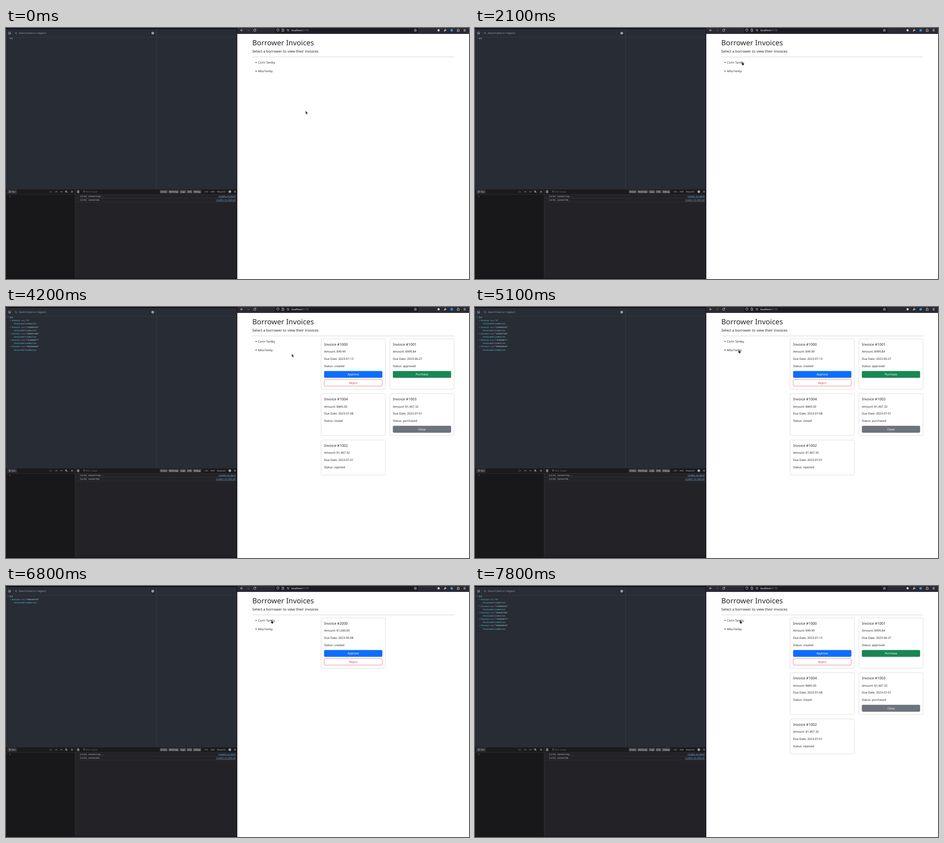
An HTML page with a canvas for the animation above (8000 ms loop, 1017 px wide and 551 px high).

```html
<!DOCTYPE html>
<html lang="en">
<head>
<meta charset="utf-8">
<title>Borrower Invoices</title>
<style>
html, body { margin: 0; width: 100%; height: 100%; overflow: hidden; background: #fff; }
canvas { display: block; }
</style>
</head>
<body>
<canvas id="stage" width="1017" height="551"></canvas>
<script>
const ctx = document.getElementById('stage').getContext('2d');
const LOOP = 8000;
const SANS = '"Noto Sans", sans-serif';
const MONO = '"Liberation Mono", monospace';
const CONSOLE = '"DejaVu Sans Mono", monospace';
const INK = '#212529', CYAN = '#61dafb', PALE = '#d7d7db';

function rect(x, y, w, h, color) {
  ctx.fillStyle = color;
  ctx.fillRect(x, y, w, h);
}

function round(x, y, w, h, r, fill, stroke, width = 0.6) {
  ctx.beginPath();
  ctx.roundRect(x, y, w, h, r);
  if (fill) { ctx.fillStyle = fill; ctx.fill(); }
  if (stroke) { ctx.strokeStyle = stroke; ctx.lineWidth = width; ctx.stroke(); }
}

function text(str, x, y, size, color, { family = SANS, weight = 400, align = 'left' } = {}) {
  ctx.font = `${weight} ${size}px ${family}`;
  ctx.textAlign = align;
  ctx.fillStyle = color;
  ctx.fillText(str, x, y);
}

function dot(x, y, r, color) {
  ctx.beginPath();
  ctx.arc(x, y, r, 0, 7);
  ctx.fillStyle = color;
  ctx.fill();
}

// Icon paths are centred on 0,0.
function icon(d, x, y, color = PALE, width = 0.8, fill) {
  ctx.save();
  ctx.translate(x, y);
  const path = new Path2D(d);
  if (fill) { ctx.fillStyle = fill; ctx.fill(path); }
  ctx.strokeStyle = color;
  ctx.lineWidth = width;
  ctx.stroke(path);
  ctx.restore();
}

const CROSS = 'M-2-2L2 2M2-2L-2 2';
const LENS = 'M.9-.5a1.5 1.5 0 1 1-3 0a1.5 1.5 0 1 1 3 0M.5.6L2.3 2.4';

function gear(x, y, color, hole) {
  for (let i = 0; i < 4; i++) {
    const a = i * Math.PI / 4, c = Math.cos(a) * 2.9, s = Math.sin(a) * 2.9;
    icon(`M${-c} ${-s}L${c} ${s}`, x, y, color, 1.1);
  }
  dot(x, y, 2.1, color);
  dot(x, y, 0.95, hole);
}

function drawInspector() {
  rect(0, 0, 508, 353, '#282c34');
  rect(0, 0, 508, 2, '#0d0c12');
  rect(0, 20, 508, 0.6, '#3d424a');
  rect(330, 2, 0.7, 351, '#3d424a');
  icon('M2.3-.2V-2.3H-2.3V2.3H-.4', 7.8, 11.4, '#b5b9c0', 0.7);
  icon('M0 0L3 1L1.6 1.6L1 3Z', 7.5, 11.2, '#b5b9c0', 0.5, '#b5b9c0');
  rect(15.3, 8, 0.6, 7, '#3d424a');
  icon(LENS, 22.2, 11.4, '#8f949d', 0.7);
  text('Search (text or /regex/)', 28.3, 13.2, 5.56, '#9b9ea5');
  gear(322.3, 11.3, '#cfd1d5', '#282c34');
}

function treeRow(row, depth, name, key, open) {
  const x = 7.5 + depth * 4.8, y = 24.1 + row * 7.15;
  if (open) icon('M-1.1-.6H1.1L0 .9Z', x - 2.9, y - 1.4, '#777d88', 0.1, '#777d88');
  const font = { family: MONO };
  text(name, x, y, 4.37, CYAN, font);
  if (!key) return;
  text('key', x + 21, y, 4.37, '#9d87d2', font);
  text('=', x + 28.9, y, 4.37, '#9aa0ab', font);
  text(`"${key}"`, x + 31.5, y, 4.37, '#cedae0', font);
}

function drawTree(keys) {
  treeRow(0, 0, 'app', '', keys.length > 0);
  keys.forEach((key, i) => {
    treeRow(1 + i * 2, 1, 'Invoice', key, true);
    treeRow(2 + i * 2, 2, 'InvoiceActionButton');
  });
}

function drawConsole() {
  rect(0, 353, 508, 198, '#232327');
  rect(0, 353, 152, 198, '#18181a');
  rect(0, 353, 508, 12.5, '#1b1b1e');
  rect(0, 353, 508, 0.7, '#38383d');
  rect(0, 365.2, 508, 0.6, '#38383d');
  rect(151.7, 353, 0.8, 198, '#38383d');

  round(2.8, 355, 21, 8.8, 1, '#343438');
  icon('M-1.7-2.2L1.9 0L-1.7 2.2Z', 9, 359.4, PALE, 0.6);
  text('Run', 12.9, 361, 4.37, PALE);
  text('{ }', 98, 361, 5, '#a5a5aa', { align: 'center' });
  icon('M-2.2 1.1L0-1.1L2.2 1.1', 110.4, 359.4);
  icon('M-2.2-1.1L0 1.1L2.2-1.1', 121.7, 359.4);
  icon(LENS, 132.6, 359.3, PALE, 0.9);
  icon(CROSS, 145, 359.4);
  icon('M-2.4-1.7H2.4M-.8-1.8V-2.6H.8V-1.8M-1.8-1.5V2.5H1.8V-1.5M-.6-.5V1.5M.6-.5V1.5', 158.5, 359.4, PALE, 0.7);
  icon('M-1.7-1.7H1.7L.4.1V1.9L-.4 1.4V.1Z', 171.5, 359.3, '#98989d', 0.6);
  text('Filter Output', 174.8, 361, 4.37, '#76767b');

  const filters = [['Errors', 338, 17], ['Warnings', 356.7, 23], ['Logs', 381.6, 13.7],
    ['Info', 397, 12.3], ['Debug', 411, 17.6]];
  for (const [label, x, w] of filters) {
    round(x, 355.7, w, 7.4, 0.8, '#4a4a4f');
    text(label, x + w / 2, 361, 4.37, '#e2e2e5', { align: 'center' });
  }
  for (const [label, x] of [['CSS', 440], ['XHR', 453.8], ['Requests', 473]])
    text(label, x, 361, 4.37, '#b8b8bd', { align: 'center' });
  gear(491.6, 359.4, PALE, '#1b1b1e');
  icon(CROSS, 503, 359.4);

  text('1', 7.3, 371, 4.37, '#b1b1b3', { family: CONSOLE });
  const logs = [['[vite] connecting...', 'client.ts:18:8'], ['[vite] connected.', 'client.ts:133:14']];
  logs.forEach(([message, link], i) => {
    const y = 371 + i * 8.3;
    text(message, 162.3, y, 4.37, PALE, { family: CONSOLE });
    text(link, 503.8, y, 4.37, '#75bfff', { family: CONSOLE, align: 'right' });
    const width = ctx.measureText(link).width;
    rect(503.8 - width, y + 0.6, width, 0.5, '#75bfff');
    rect(152.5, y + 2.4, 355, 0.6, '#38383d');
  });
  rect(0, 549.5, 508, 1.5, '#121116');
  rect(507.2, 0, 1, 551, '#0d0c12');
}

function drawBrowser() {
  rect(508.2, 0, 509, 13, '#2b2a33');
  round(591, -2, 315, 12.4, 1.6, '#1c1b22');
  const light = '#f0f0f4';
  icon('M2.6 0H-2.5M-.2-2.4L-2.6 0L-.2 2.4', 517.8, 5, light);
  icon('M-2.6 0H2.5M.2-2.4L2.6 0L.2 2.4', 532, 5, '#5d5c66');
  icon('M2.1-1.5A2.5 2.5 0 1 0 2.5.5M2.5-2.8V-.9H.6', 546.4, 5, light);
  icon('M0-2.8L2.4-1.9C2.4.8 1.6 2.2 0 2.9C-1.6 2.2-2.4.8-2.4-1.9Z', 597.3, 4.8, light, 0.7);
  icon('M-1.9-2.6H.5L2-1.1V2.6H-1.9ZM.4-2.5V-1H2', 608.2, 4.8, light, 0.7);
  icon('M-2.6-1.3H2.6M-2.6 1.3H2.6M-1.2-2.3V-.3M1.2 .3V2.3', 619.5, 4.8, '#cfcfd5', 0.7);
  text('localhost', 626.7, 6.8, 5.55, '#fbfbfe');
  text(':5173', 626.7 + ctx.measureText('localhost').width, 6.8, 5.55, '#9b9aa3');
  icon('M0-2.8L.8-.9L2.8-.8L1.3.5L1.8 2.5L0 1.4L-1.8 2.5L-1.3.5L-2.8-.8L-.8-.9Z', 899.2, 5, light, 0.7);
  dot(950.2, 5, 2.4, '#dcdce2');
  icon('M-2.3 2.3L.8-.8', 964.5, 5, light, 1.4);
  icon('M1.2-2.6A1.7 1.7 0 1 0 2.7-1.1', 964.5, 5, light, 0.9);
  dot(979, 5, 2.8, '#2196f3');
  icon('M-2.3-1.4H-.8V-2.2A.8.8 0 0 1 .8-2.2V-1.4H2.2V2.6H-2.3V1.2H-1.4A.8.8 0 0 0-1.4-.2H-2.3Z', 993.3, 5, light, 0.7);
  icon('M-2.3-1.9H2.3M-2.3 0H2.3M-2.3 1.9H2.3', 1007.4, 5, light, 0.7);
}

function drawPage() {
  rect(508.2, 13, 509, 538, '#fff');
  text('Borrower Invoices', 541, 38.4, 15.9, INK, { weight: 500 });
  text('Select a borrower to view their invoices', 541, 53.8, 7.95, INK, { weight: 300 });
  rect(541, 63, 443.4, 0.8, '#c8c9ca');
  ['Corin Tamby', 'Mila Fenby'].forEach((name, i) => {
    dot(549.3, 75.6 + i * 19.1, 1.15, INK);
    text(name, 553.6, 77.5 + i * 19.1, 6.36, INK);
  });
}

const ACTIONS = {
  created: [['Approve', '#0d6efd'], ['Reject', '#dc3545', true]],
  approved: [['Purchase', '#198754']],
  purchased: [['Close', '#6c757d']],
};
const ROWS = [{ y: 70, h: 110.5 }, { y: 190.3, h: 91.8 }, { y: 292, h: 76.8 }];

function drawCard([id, amount, due, status], index) {
  const x = 692 + (index % 2) * 151;
  const { y, h } = ROWS[index >> 1];
  round(x + 0.2, y, 141.1, h, 2.4, '#fff', '#cfcfcf', 0.7);
  text(`Invoice #${id}`, x + 6.7, y + 14.6, 7.95, INK, { weight: 500 });
  [`Amount: $${amount}`, `Due Date: ${due}`, `Status: ${status}`].forEach((line, i) =>
    text(line, x + 6.7, y + 30.2 + i * 15.9, 6.36, INK));
  (ACTIONS[status] || []).forEach(([label, color, outline], i) => {
    const top = y + 70.5 + i * 18.3;
    if (outline) round(x + 7, top + 0.3, 127.4, 14.5, 2.2, '#fff', color);
    else round(x + 6.7, top, 128, 15.1, 2.4, color);
    text(label, x + 70.7, top + 9.9, 6.36, outline ? color : '#fff', { align: 'center' });
  });
}

const NOBODY = { keys: [], invoices: [] };
const FIRST = {
  keys: ['1', '132003151', '420457160', '781093977', '820640446'],
  invoices: [
    ['1000', '99.99', '2023-07-13', 'created'],
    ['1001', '999.84', '2023-06-27', 'approved'],
    ['1004', '845.00', '2023-07-08', 'closed'],
    ['1003', '1,467.32', '2023-07-01', 'purchased'],
    ['1002', '1,467.32', '2023-07-01', 'rejected'],
  ],
};
const SECOND = {
  keys: ['480420718'],
  invoices: [['2000', '1,000.00', '2023-06-08', 'created']],
};

function selection(t) {
  if (t < 2700) return NOBODY;
  return t >= 5700 && t < 7300 ? SECOND : FIRST;
}

// time, left, top, hand pointer
const POSES = [
  [2000, 587, 76, 1], [2100, 585.2, 73.6, 1], [3500, 584, 73.6, 1], [3700, 592.5, 75.5, 0],
  [3900, 606, 82, 0], [4000, 620.5, 90, 0], [4200, 627.6, 102.8, 0], [4400, 618, 110.5, 0],
  [4500, 603.5, 106.8, 0], [4700, 575.6, 90.6, 1], [4900, 575, 90.3, 1], [5100, 577.7, 93.2, 1],
  [6400, 582.8, 97.3, 1], [6600, 582.2, 84.5, 1], [6800, 581.5, 74.2, 1], [7800, 580.6, 74.2, 1],
];

function pointer(t) {
  if (t < 2000) {
    const p = Math.max(0, Math.min(9, Math.floor(t / 100) - 10)) / 9;
    const e = p * p * (3 - 2 * p);
    return { x: 658 - 67 * e, y: 182 - 102 * e, hand: 0 };
  }
  const [, x, y, hand] = POSES.findLast(pose => pose[0] <= t);
  return { x, y, hand };
}

const ARROW = 'M.3.3V6.5L1.7 5.3L2.7 7.7L3.8 7.2L2.8 4.9L4.7 4.8Z';
const HAND = 'M.9.8C.9.1 2 .1 2.1.8L2.5 3.1L4.9 3.7C5.5 3.9 5.7 4.3 5.6 4.9L5.1 8H2.2L.5 5.6C.1 4.9.8 4.4 1.3 4.9L1.5 4.8Z';

function drawPointer(t) {
  const { x, y, hand } = pointer(t);
  const shape = hand ? HAND : ARROW;
  icon(shape, x, y, '#fff', 1);
  icon(shape, x, y, '#31363b', 0.2, '#31363b');
}

function draw(now) {
  const t = now % LOOP;
  const { keys, invoices } = selection(t);
  ctx.textRendering = 'geometricPrecision';
  drawInspector();
  drawTree(keys);
  drawConsole();
  drawBrowser();
  drawPage();
  invoices.forEach(drawCard);
  drawPointer(t);
}

const start = performance.now();
function tick() {
  draw(performance.now() - start);
  requestAnimationFrame(tick);
}
tick();
</script>
</body>
</html>
```
